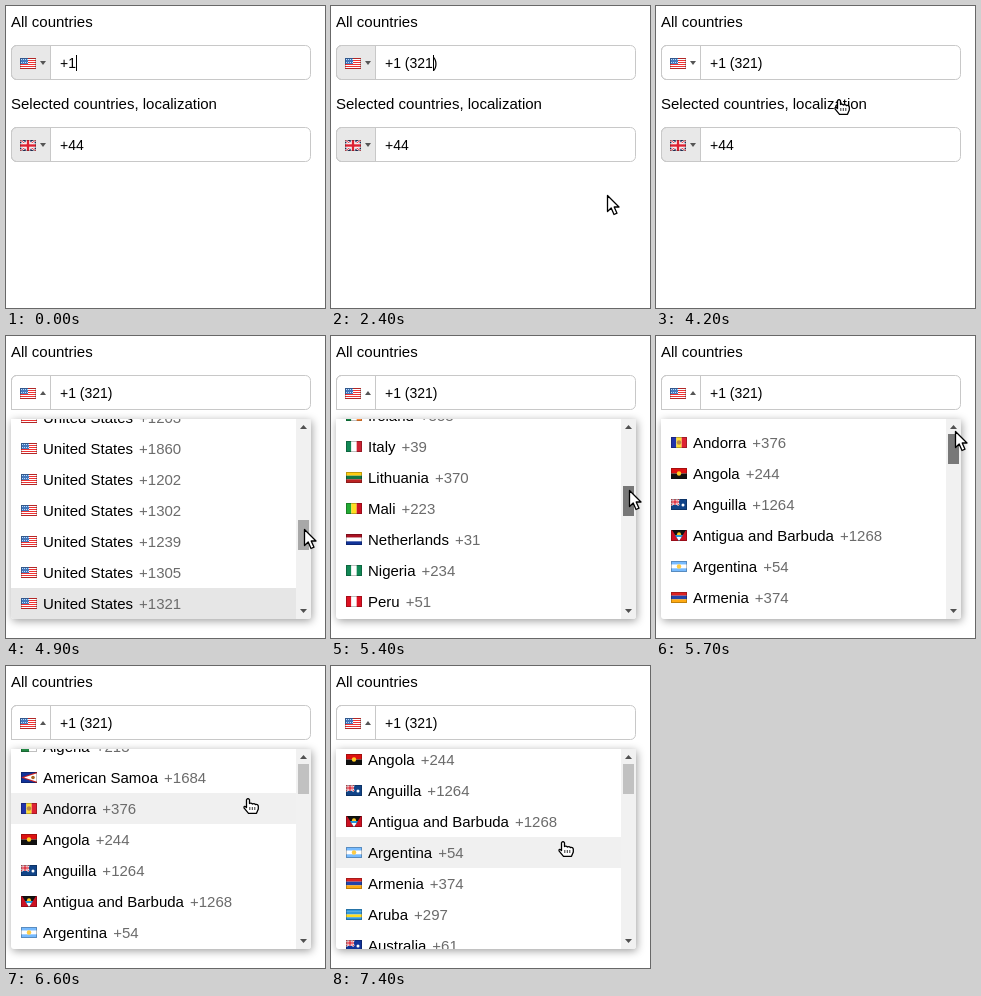
Write an HTML page with a canvas that moves like this. It is 319x302 px and loops after 8 s.

```html
<!DOCTYPE html>
<html lang="en">
<head>
<meta charset="utf-8">
<title>Phone input</title>
<style>
html, body { margin: 0; width: 100%; height: 100%; overflow: hidden; background: #fff; }
canvas { display: block; }
</style>
</head>
<body>
<canvas id="stage" width="319" height="302"></canvas>
<script>
const ctx = document.getElementById('stage').getContext('2d');
const LOOP = 8000, STEP = 100;
const LIST = { x: 5, y: 83, w: 300, h: 200, row: 31, bar: 290 };

// Flags: band direction, band colours, then an optional mark (see MARKS).
const US_FLAG = 'h' + Array.from({ length: 11 }, (_, i) => i % 2 ? 'fff' : 'e33').join() + ' us';
const COUNTRIES = `Afghanistan|93|v111,c22,184 dot fff
Albania|355|hd22 dot 111
Algeria|213|v284,fff dot d22
American Samoa|1684|h139 samoa
Andorra|376|v23a,fd3,d23 dot b84
Angola|244|hd11,111 dot fc2
Anguilla|1264|h148 union
Antigua and Barbuda|1268|hc12 antigua
Argentina|54|h7bf,fff,7bf dot fc4
Armenia|374|hd22,24a,fa1
Aruba|297|h39d,39d,fd2,39d
Australia|61|h139 union
Austria|43|hd23,fff,d23
Belgium|32|v111,fd2,d23
Bolivia|591|hd22,fe2,184
Bulgaria|359|hfff,196,c22
Chad|235|v129,fc1,c12
Colombia|57|hfd2,fd2,13a,c12
Estonia|372|h27c,111,fff
France|33|v139,fff,d23
Gabon|241|h2a5,fd2,36b
Germany|49|h111,c11,fc1
Guinea|224|vc12,fd2,185
Hungary|36|hc23,fff,364
Ireland|353|v184,fff,f83
Italy|39|v185,fff,c23
Lithuania|370|hfc1,174,b22
Mali|223|v2a3,fd2,c12
Netherlands|31|ha12,fff,139
Nigeria|234|v185,fff,185
Peru|51|vd12,fff,d12
Poland|48|hfff,d23
Romania|40|v137,fd2,c12
Sierra Leone|232|h2b4,fff,17c
Thailand|66|hc23,fff,225,225,fff,c23
Ukraine|380|h26b,fd1`.split('\n').map(line => line.split('|'));
const AREAS = [1719, 1970, 1203, 1860, 1202, 1302, 1239, 1305, 1321];
const ROWS = [...COUNTRIES, ...AREAS.map(code => ['United States', code, US_FLAG])];
const SELECTED = ROWS.length - 1;
const END = ROWS.length * LIST.row - LIST.h;

// Keyframes: time, then values.
const POINTER = [
  [2500, 276, 189], [3000, 150, 122], [3400, 24, 56], [3800, 24, 56], [4200, 183, 93],
  [4700, 268, 170], [4900, 298, 193], [5200, 298, 193], [5700, 299, 95], [5800, 299, 95],
  [6100, 242, 132], [6700, 242, 132], [7200, 232, 150], [7300, 232, 150], [7400, 232, 175]
];
const SCROLL = [
  [5200, END], [5700, 116], [5900, 0], [6100, 0], [6400, 72], [6500, 72],
  [6600, 80], [6700, 80], [7200, 160]
];
const THUMB = [[5200, 184], [5700, 98]];
const CARET_TOGGLES = [300, 700, 1800, 2200, 2800, 3200, 3600];

function track(keys, t) {
  const next = keys.findIndex(key => key[0] > t);
  if (next === 0) return keys[0].slice(1);
  if (next < 0) return keys[keys.length - 1].slice(1);
  const [a, b] = [keys[next - 1], keys[next]];
  const k = (t - a[0]) / (b[0] - a[0]);
  return a.slice(1).map((v, i) => Math.round(v + (b[i + 1] - v) * k));
}

function rect(color, x, y, w, h) {
  ctx.fillStyle = color;
  ctx.fillRect(x, y, w, h);
}

function poly(color, ...points) {
  ctx.fillStyle = color;
  ctx.beginPath();
  points.forEach(([x, y]) => ctx.lineTo(x, y));
  ctx.fill();
}

function dot(color, x, y, r) {
  ctx.fillStyle = color;
  ctx.beginPath();
  ctx.arc(x, y, r, 0, 7);
  ctx.fill();
}

function line(color, width, ...points) {
  ctx.strokeStyle = color;
  ctx.lineWidth = width;
  ctx.beginPath();
  points.forEach(([x, y]) => ctx.lineTo(x, y));
  ctx.stroke();
}

function text(str, x, y, size = 15, color = '#000') {
  ctx.font = `${size}px "Liberation Sans", Arial, sans-serif`;
  ctx.fillStyle = color;
  ctx.fillText(str, x, y);
  return x + ctx.measureText(str).width;
}

function unionJack(w, h) {
  rect('#236', 0, 0, w, h);
  for (const [color, width] of [['#fff', 2.4], ['#d23', 0.9]]) {
    line(color, width, [0, 0], [w, h]);
    line(color, width, [w, 0], [0, h]);
  }
  for (const [color, size] of [['#fff', 0.42], ['#d23', 0.22]]) {
    rect(color, 0, h * (1 - size) / 2, w, h * size);
    rect(color, (w - h * size) / 2, 0, h * size, h);
  }
}

const MARKS = {
  dot: color => dot('#' + color, 8, 5.5, 2.2),
  us: () => {
    rect('#47b', 0, 0, 8, 6);
    for (let i = 0; i < 8; i++) rect('#bdf', 1 + i % 4 * 2, 1 + (i >> 2) * 3, 1, 1);
  },
  union: () => {
    unionJack(8, 6);
    dot('#fff', 12, 6, 1.5);
  },
  jack: () => unionJack(16, 11),
  samoa: () => {
    poly('#c22', [16, 0], [0, 5.5], [16, 11]);
    poly('#fff', [16, 1.2], [3, 5.5], [16, 9.8]);
    dot('#a62', 12, 5.5, 1.8);
  },
  antigua: () => {
    poly('#111', [1, 0], [15, 0], [8, 11]);
    dot('#fc2', 8, 4.2, 2);
    poly('#29d', [4, 5], [12, 5], [8, 11]);
    poly('#fff', [5.5, 7], [10.5, 7], [8, 11]);
  }
};

function flag(spec, x, y) {
  const [bands, mark, arg] = spec.split(' ');
  const colors = bands.slice(1).split(',');
  const n = colors.length;
  ctx.save();
  ctx.translate(x, y);
  ctx.beginPath();
  ctx.rect(0, 0, 16, 11);
  ctx.clip();
  colors.forEach((c, i) => bands[0] === 'h'
    ? rect('#' + c, 0, i * 11 / n, 16, 11 / n)
    : rect('#' + c, i * 16 / n, 0, 16 / n, 11));
  if (mark) MARKS[mark](arg);
  ctx.strokeStyle = 'rgba(0,0,0,.25)';
  ctx.lineWidth = 1;
  ctx.strokeRect(0.5, 0.5, 15, 10);
  ctx.restore();
}

function triangle(color, x, y, half, height) {
  poly(color, [x - half, y], [x + half, y], [x, y + height]);
}

function field(y, spec, value, { active, open, caret } = {}) {
  const bottomLeft = open ? 0 : 5;
  ctx.lineWidth = 1;
  ctx.strokeStyle = '#c8c8c8';
  ctx.beginPath();
  ctx.roundRect(5.5, y + 0.5, 39, 34, [5, 0, 0, bottomLeft]);
  ctx.fillStyle = active ? '#fff' : '#e8e8e8';
  ctx.fill();
  ctx.stroke();
  ctx.beginPath();
  ctx.roundRect(5.5, y + 0.5, 299, 34, [5, 5, 5, bottomLeft]);
  ctx.stroke();
  flag(spec, 14, y + 13);
  if (open) triangle('#555', 37, y + 20, 3, -4);
  else triangle('#555', 37, y + 16, 3, 4);
  const [before, after = ''] = value.split('_');
  const end = text(before, 54, y + 23, 14);
  text(after, end, y + 23, 14);
  if (caret) rect('#000', Math.round(end), y + 10, 1, 16);
}

function dropdown(t, [px, py]) {
  const { x, y, w, h, row, bar } = LIST;
  const [scroll] = track(SCROLL, t);
  const [thumb] = track(THUMB, t);
  const settled = t < 4900 || (t >= 6600 && t < 6800) || t >= 7400;
  const hovered = settled && px < bar ? Math.floor((py - y + scroll) / row) : -1;

  ctx.save();
  ctx.shadowColor = 'rgba(0,0,0,.38)';
  ctx.shadowBlur = 9;
  ctx.shadowOffsetX = 1;
  ctx.shadowOffsetY = 2;
  ctx.beginPath();
  ctx.roundRect(x, y, w, h, [0, 0, 3, 3]);
  ctx.fillStyle = '#fff';
  ctx.fill();
  ctx.restore();

  ctx.save();
  ctx.beginPath();
  ctx.roundRect(x, y, w, h, [0, 0, 3, 3]);
  ctx.clip();
  ROWS.forEach(([name, code, spec], i) => {
    const top = y + i * row - scroll;
    if (top < y - row || top > y + h) return;
    if (i === SELECTED) rect('#e6e6e6', x, top, w, row);
    else if (i === hovered) rect('#f0f0f0', x, top, w, row);
    flag(spec, 15, top + 10);
    text('+' + code, text(name, 37, top + 21) + 6, top + 21, 15, '#6b6b6b');
  });
  rect('#f1f1f1', bar, y, 15, h);
  const dragging = t >= 5300 && t < 5900;
  const overThumb = t >= 4800 && t < 5300;
  rect(dragging ? '#787878' : overThumb ? '#a8a8a8' : '#c1c1c1', bar + 2, thumb, 11, 30);
  triangle('#505050', bar + 7.5, y + 10, 3.5, -4);
  triangle('#505050', bar + 7.5, y + h - 10, 3.5, 4);
  ctx.restore();
}

const ARROW = new Path2D('M.5 .5V16.5L4.2 13L7 19.5L10 18.2L7.2 12H12Z');
const HAND = new Path2D('M-1.5 9.5V1.8Q0 -.5 1.5 1.8V5.5Q3 4.5 4.5 6Q6 5 7.5 6.5' +
  'Q9.8 6 10.3 8V11L8.5 15.3H.5L-4 9.8Q-4.2 7 -1.5 9.5Z');
const FINGERS = new Path2D('M1.8 9V12M4.3 9V12M6.8 9V12');

function pointer(x, y, hand) {
  ctx.save();
  ctx.translate(x, y);
  ctx.fillStyle = '#fff';
  ctx.strokeStyle = '#000';
  ctx.lineWidth = 1.3;
  ctx.lineJoin = 'round';
  const shape = hand ? HAND : ARROW;
  ctx.fill(shape);
  ctx.stroke(shape);
  ctx.lineWidth = 0.8;
  if (hand) ctx.stroke(FINGERS);
  ctx.restore();
}

function draw(t) {
  const position = track(POINTER, t);
  const open = t >= 4300;
  const caret = CARET_TOGGLES.filter(time => time <= t).length % 2 === 0 && t < 3600;
  const value = t < 700 ? '+1_' : t < 1000 ? '+1 (32_)' : '+1 (321_)';

  rect('#fff', 0, 0, 319, 302);
  text('All countries', 5, 21);
  field(39, US_FLAG, value, { active: t >= 3300, open, caret });
  text('Selected countries, localization', 5, 103);
  field(121, 'h236 jack', '+44');
  if (open) dropdown(t, position);
  if (t >= 2400) pointer(...position, t >= 3300 && position[0] < LIST.bar);
}

function frame() {
  draw(Math.floor(performance.now() % LOOP / STEP) * STEP);
  requestAnimationFrame(frame);
}
frame();
</script>
</body>
</html>
```
